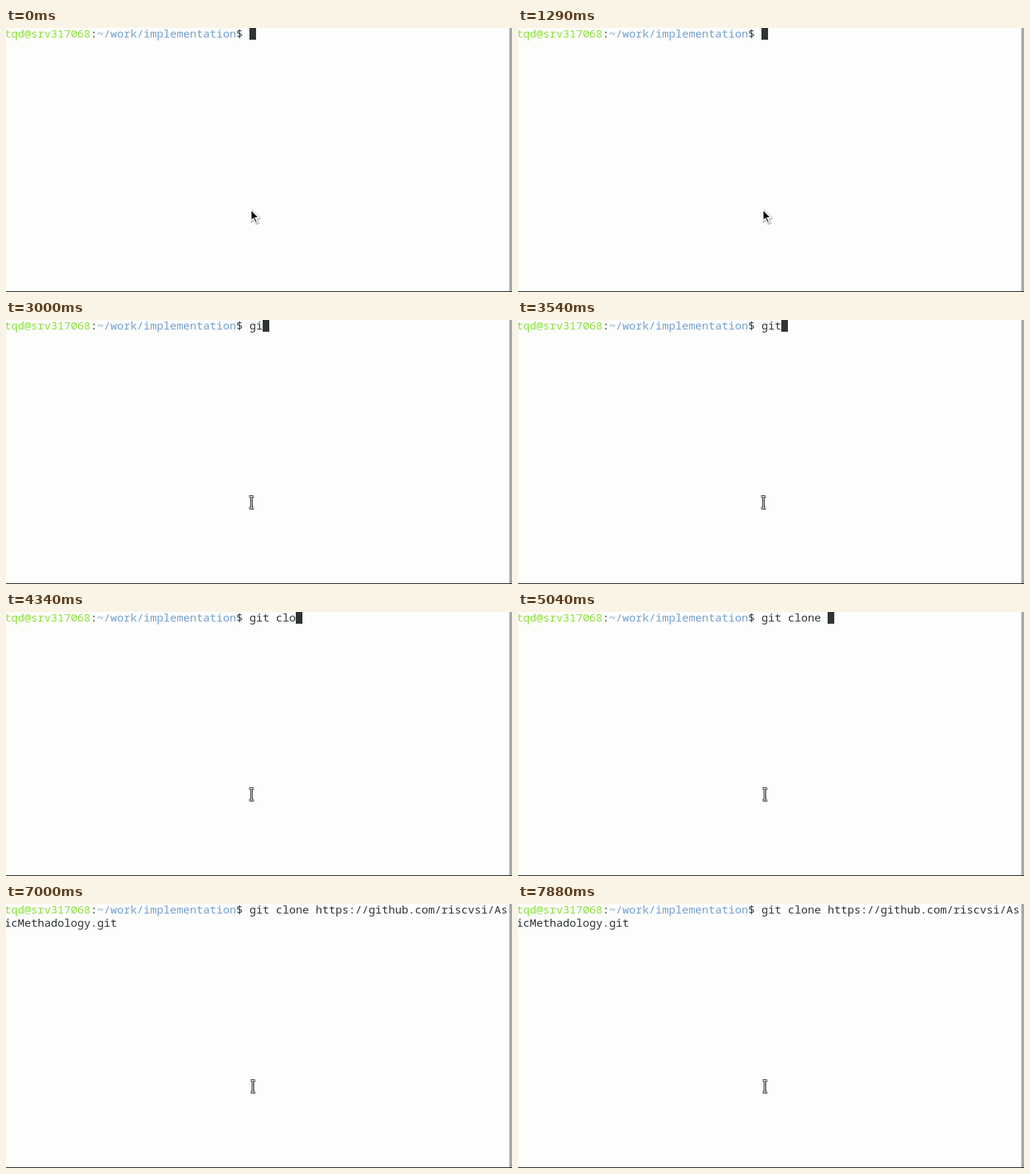
Recreate the animation shown at these times as an HTML page. Size 688 by 360 pixels, loop 8 s.

```html
<!DOCTYPE html>
<html lang="en">
<head>
<meta charset="utf-8">
<title>Terminal</title>
<style>
  html, body { margin: 0; width: 100%; height: 100%; overflow: hidden; background: #fdfdfc; }
  #stage { position: relative; width: 688px; height: 360px; overflow: hidden; background: #fdfdfc; }
  pre { position: absolute; left: -2px; top: -2px; margin: 0; color: #2e3436;
        font: 15px/18px "Noto Sans Mono", "DejaVu Sans Mono", monospace; }
  .user { color: #8ae234; }
  .path { color: #729fcf; }
  #caret { position: absolute; width: 9px; height: 18px; background: #2e3436; }
  svg { position: absolute; left: 0; top: 0; }
</style>
</head>
<body>
<div id="stage">
  <pre><span class="user">tqd@srv317068</span>:<span class="path">~/work/implementation</span>$ <span id="typed"></span></pre>
  <div id="caret"></div>
  <svg width="688" height="360" viewBox="0 0 688 360">
    <defs>
      <path id="arrowShape" d="M333 247.5V263l3.4-3.2 2.8 6 2.6-1.2-2.8-5.8h4.8z"/>
      <path id="beamShape" d="M-3 240.5H3M0 240.5V256.5M-3 256.5H3"/>
    </defs>
    <rect x="684" width="1" height="360" fill="#c9c9cc"/>
    <rect x="685" width="3" height="360" fill="#a6a6ac"/>
    <rect y="359" width="688" height="1" fill="#1c1c1c"/>
    <g id="arrow" fill="#101010" stroke-linejoin="round">
      <use href="#arrowShape" x="1" y="1" stroke="#bcbcbc" stroke-width="3"/>
      <use href="#arrowShape" stroke="#fdfdfc" stroke-width="1.5"/>
    </g>
    <g id="beam" fill="none">
      <use href="#beamShape" x="1" y="1" stroke="#b4b4b4" stroke-width="3"/>
      <use href="#beamShape" stroke="#2e3436" stroke-width="3"/>
      <use href="#beamShape" stroke="#f2f2f2" stroke-width="1"/>
    </g>
  </svg>
</div>
<script>
const LOOP = 8000, CELL = 9, LINE = 18, ORIGIN = -2, PROMPT = 37;
const command = "git clone https://github.com/riscvsi/As\nicMethadology.git";

// Each entry: time in ms and the number of characters present from then on.
const keys = [[0, 0], [2880, 1], [2960, 2], [3340, 3], [3960, 4], [4040, 5], [4090, 6],
              [4340, 7], [4590, 8], [4710, 9], [4840, 10], [6290, command.length]];
const caretOff = [[290, 880], [1500, 2090], [2670, 2880], [5420, 6040], [6630, 7290], [7880, LOOP]];
const beamStart = 1540, beamNudge = 4800;

const $ = id => document.getElementById(id);
const show = (el, on) => { el.style.visibility = on ? "visible" : "hidden"; };

function render(t) {
  const count = keys.filter(([time]) => time <= t).pop()[1];
  const text = command.slice(0, count);
  const rows = text.split("\n");
  const row = rows.length - 1;
  const column = rows[row].length + (row ? 0 : PROMPT);

  if ($("typed").textContent !== text) $("typed").textContent = text;
  $("caret").style.left = ORIGIN + column * CELL + "px";
  $("caret").style.top = ORIGIN + row * LINE + "px";
  show($("caret"), !caretOff.some(([from, to]) => t >= from && t < to));

  show($("arrow"), t < beamStart);
  show($("beam"), t >= beamStart);
  $("beam").setAttribute("transform", `translate(${t < beamNudge ? 333.5 : 335.5} 0)`);
}

const start = performance.now();
function tick() {
  render((performance.now() - start) % LOOP);
  requestAnimationFrame(tick);
}
tick();
</script>
</body>
</html>
```
